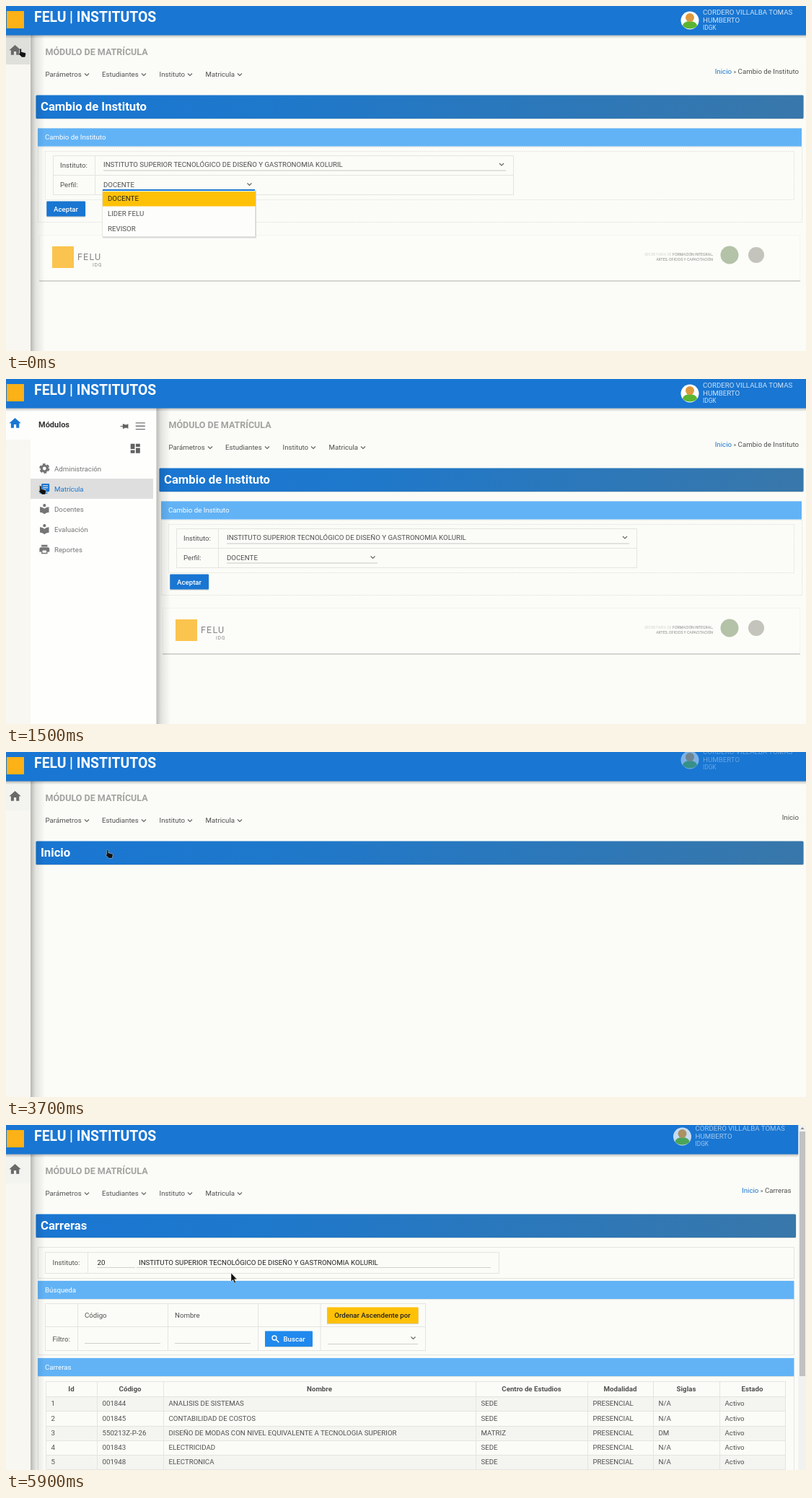
Recreate the animation shown at these times as an HTML page. Size 1109 by 478 pixels, loop 6 s.

```html
<!DOCTYPE html>
<html lang="es">
<head>
<meta charset="utf-8">
<title>Módulo de matrícula</title>
<style>
html, body { margin: 0; width: 100%; height: 100%; overflow: hidden; background: #fbfcf7; }
svg { display: block; font: 9.7px Roboto, sans-serif; fill: #505050; }
.b { font-weight: 700; }
.m { font-weight: 500; }
</style>
</head>
<body>
<svg id="stage" width="1109" height="478" viewBox="0 0 1109 478"></svg>
<script>
const LOOP = 6000, STEP = 100, SHIFT = 171;
const BLUE = '#1976d2', SKY = '#62b3f6', AMBER = '#ffc107', GRAY = '#757575';
const SCHOOL = 'INSTITUTO SUPERIOR TECNOLÓGICO DE DISEÑO Y GASTRONOMIA KOLURIL';
const MODULES = ['Administración', 'Matrícula', 'Docentes', 'Evaluación', 'Reportes'];
const SUBMENU = ['Periodos', 'Centros', 'Carreras', 'Campus', 'Aulas', 'Turnos para Horarios',
  'Personal Administrativo'];
const CAREERS = [
  ['1', '001844', 'ANALISIS DE SISTEMAS', 'SEDE', 'PRESENCIAL', 'N/A', 'Activo'],
  ['2', '001845', 'CONTABILIDAD DE COSTOS', 'SEDE', 'PRESENCIAL', 'N/A', 'Activo'],
  ['3', '550213Z-P-26', 'DISEÑO DE MODAS CON NIVEL EQUIVALENTE A TECNOLOGIA SUPERIOR', 'MATRIZ', 'PRESENCIAL', 'DM', 'Activo'],
  ['4', '001843', 'ELECTRICIDAD', 'SEDE', 'PRESENCIAL', 'N/A', 'Activo'],
  ['5', '001948', 'ELECTRONICA', 'SEDE', 'PRESENCIAL', 'N/A', 'Activo']];
const POINTER = [[0, 18, 59], [500, 14, 59], [700, 22, 68.5], [800, 90, 82], [1000, 274, 100],
  [1200, 110, 144], [1400, 42, 148], [1500, 46, 148], [1900, 93, 155], [2300, 94, 150], [2500, 99, 124],
  [2800, 93, 155], [3500, 93, 155], [4100, 230, 96], [4600, 230, 96], [5000, 246, 172],
  [5500, 247, 171.5], [5600, 252, 174], [5900, 312, 205]];

const BOOK = 'M12 11.55C9.64 9.35 6.48 8 3 8v11c3.48 0 6.64 1.35 9 3.55 2.36-2.19 5.52-3.55 9-3.55V8c-3.48 0-6.64 1.35-9 3.55zM12 8a3 3 0 1 0 0-6 3 3 0 0 0 0 6z';
const ICON = {
  home: 'M10 20v-6h4v6h5v-8h3L12 3 2 12h3v8z',
  pages: 'M4 6H2v14q0 2 2 2h14v-2H4zM20 2H8q-2 0-2 2v12q0 2 2 2h12q2 0 2-2V4q0-2-2-2zM19 11H9V9h10zM15 15H9v-2h6zM19 7H9V5h10z',
  print: 'M19 8H5q-3 0-3 3v6h4v4h12v-4h4v-6q0-3-3-3zM16 19H8v-5h8zM18 3H6v4h12z',
  tiles: 'M3 3h8v10H3zM3 15h8v6H3zM13 11h8v10h-8zM13 3h8v6h-8z',
  pin: 'M2 11h6V6h3l2 2h6l2-2h1v12h-1l-2-2h-6l-2 2H8v-5H2z',
  bars: 'M3 5h18v2H3zM3 11h18v2H3zM3 17h18v2H3z'
};

const clamp = v => Math.max(0, Math.min(1, v));
const easeOut = v => 1 - (1 - clamp(v)) ** 2;
const text = (x, y, s, attrs = '') => `<text x="${x}" y="${y}" ${attrs}>${s}</text>`;
const box = (x, y, x2, y2, fill, attrs = '') =>
  `<rect x="${x}" y="${y}" width="${x2 - x}" height="${y2 - y}" fill="${fill}" ${attrs}/>`;
const frame = (x, y, x2, y2, attrs = '') => box(x + .5, y + .5, x2 + .5, y2 + .5, 'none', `stroke="#e4e4e0" ${attrs}`);
const line = (d, color = '#e4e4e0', w = 1) => `<path d="${d}" fill="none" stroke="${color}" stroke-width="${w}"/>`;
const icon = (d, x, y, size, fill) =>
  `<path d="${d}" fill="${fill}" fill-rule="evenodd" transform="translate(${x} ${y}) scale(${size / 24})"/>`;
const chevron = (x, y) => line(`M${x - 3} ${y - 1.5}l3 3 3-3`, '#666', 1.2);
const heading = (x, x2, y, s) => box(x, y + .4, x2, y + 25.5, SKY) + text(x + 10, y + 16, s, 'fill="#fff"');
const gear = (x, y) => `<g fill="none" stroke="${GRAY}"><circle cx="${x}" cy="${y}" r="4" stroke-width="3.2"/>
  <circle cx="${x}" cy="${y}" r="6" stroke-width="2.2" stroke-dasharray="3.6 2.683"/></g>`;

function pointerAt(t) {
  const i = POINTER.findIndex(p => p[0] > t);
  if (i < 0) return POINTER.at(-1).slice(1);
  const [t0, x0, y0] = POINTER[i - 1], [t1, x1, y1] = POINTER[i], k = (t - t0) / (t1 - t0);
  return [x0 + (x1 - x0) * k, y0 + (y1 - y0) * k];
}

function header(right, shown) {
  const dx = right - 1109, dy = -16 * (1 - shown);
  return box(0, 40, right, 45, 'url(#down)') + box(0, 0, right, 40.5, BLUE)
    + box(1, 7, 25, 31, '#fcb116')
    + text(39, 22, 'FELU', 'class="b" font-size="19.4" fill="#fff"')
    + text(88, 22, '| INSTITUTOS', 'class="b" font-size="19.4" fill="#fff"')
    + `<g transform="translate(${dx} ${dy})" opacity="${shown}">
      <circle cx="948" cy="20" r="12.5" fill="#fff"/>
      <path d="M938 27.500q1-6.500 10-6.500t10 6.500q-4 4-10 4t-10-4z" fill="#5cb531"/>
      <circle cx="948" cy="16" r="6" fill="#dd9a3e"/>
      <g fill="#cfe2f6">${text(966, 11.5, 'CORDERO VILLALBA TOMAS') + text(966, 23, 'HUMBERTO')
        + text(966, 33, 'IDGK', 'font-size="8.3"')}</g></g>`;
}

// Menu, breadcrumb and title shared by all pages; dx is the push from the sidebar.
function pageTop(dx, right, title, highlight) {
  const items = [['Parámetros', 54.5, 112], ['Estudiantes', 133, 191], ['Instituto', 212.5, 255], ['Matricula', 276.5, 324]];
  const crumb = title === 'Inicio' ? title : `<tspan fill="${BLUE}">Inicio</tspan> <tspan font-size="8">»</tspan> ${title}`;
  return `<g transform="translate(${dx} 0)">`
    + text(54.5, 67.5, 'MÓDULO DE MATRÍCULA', 'class="b" font-size="12.5" fill="#a2a2a0"')
    + (highlight ? box(206, 84, 268, 107, '#dcdcda') : '')
    + items.map(([s, x, c]) => text(x, 97.5, s) + chevron(c, 95)).join('') + '</g>'
    + text(right - 10, 93.5, crumb, 'text-anchor="end"')
    + box(41.5 + dx, 156, right - 3.5, 157, '#000', 'opacity=".12"')
    + box(41.4 + dx, 123.5, right - 3.4, 156, 'url(#bar)', 'rx="1.5"')
    + text(48 + dx, 145, title, 'class="b" font-size="16.7" fill="#fff"');
}

function changePage(dx, list) {
  const x = 44 + dx;
  let s = pageTop(dx, 1109, 'Cambio de Instituto')
    + frame(x, 195, 1103, 299, 'stroke-dasharray="2 1"') + heading(x, 1103, 169, 'Cambio de Instituto')
    + frame(x + 10, 201, 1092, 268, 'stroke-dasharray="2 1"')
    + box(46 + dx, 318, 1101, 381, '#fcfdf9') + frame(46 + dx, 317, 1100, 380, 'opacity=".35"')
    + line(`M${46 + dx} 381H1101`, '#c9c9c7', 1.3)
    + text(980, 346, '<tspan opacity=".35">SECRETARÍA DE</tspan> FORMACIÓN INTEGRAL,', 'text-anchor="end" font-size="5.2" fill="#8a8a88"')
    + text(980, 352.5, 'ARTES, OFICIOS Y CAPACITACIÓN', 'text-anchor="end" font-size="5.2" fill="#8a8a88"')
    + '<circle cx="1003" cy="345" r="12.500" fill="#b4c2a8"/><circle cx="1040" cy="345" r="11" fill="#c4c4bd"/>';
  s += `<g transform="translate(${dx} 0)">` + frame(65, 207, 703, 261)
    + line('M65 234.500H704M123.500 207V262') + line('M135 228H693M135 255H344', '#c8c8c6')
    + text(75, 224, 'Instituto:') + text(135, 223.3, SCHOOL) + chevron(687, 219.5)
    + text(75, 251.3, 'Perfil:') + text(135, 251, 'DOCENTE') + chevron(337.5, 247)
    + box(56, 271, 110.5, 292.7, '#000', 'opacity=".15" rx="1"') + box(56.3, 270.4, 110, 291.6, BLUE, 'rx="1"')
    + text(83, 284.5, 'Aceptar', 'class="m" text-anchor="middle" fill="#fff"')
    + box(64, 333, 94, 363, '#fbc44f')
    + text(99, 351.8, 'FELU', 'font-size="12.500" letter-spacing="1.200" fill="#858583"')
    + text(120, 361, 'IDG', 'font-size="6.500" letter-spacing="1" fill="#858583"');
  if (list > 0) s += `<g opacity="${list}">` + box(134, 255, 347, 321.5, '#000', 'opacity=".15"')
    + box(134, 255, 346, 320, '#fdfdfb') + frame(133, 255, 345, 319) + box(134, 257, 346, 277.5, AMBER)
    + line('M134 255H345', BLUE, 2) + text(141, 270.3, 'DOCENTE', 'fill="#222"')
    + text(141, 291.3, 'LIDER FELU') + text(141, 312.2, 'REVISOR') + '</g>';
  return s + '</g>';
}

function homePage(menu, highlight, hover) {
  let s = pageTop(0, 1109, 'Inicio', highlight);
  if (menu > 0) {
    s += `<g opacity="${menu}">` + box(205, 108, 330, 332.5, '#000', 'opacity=".16"')
      + box(206, 108, 329, 331, '#fcfcfa') + frame(205, 107, 328, 330, 'stroke="#d0d0ce"');
    if (hover >= 0) s += box(207, 112 + hover * 22.4, 328, 134.4 + hover * 22.4, '#e2e2e0');
    s += SUBMENU.map((m, i) => text(213.3, 126.3 + i * 22.4, m)).join('')
      + text(213.3, 283, 'Unidades') + text(213.3, 294, 'Administrativas') + text(213.3, 315, 'Maestro de Asignaturas') + '</g>';
  }
  return s;
}

function careersPage() {
  const cols = [55, 126, 218, 651, 806, 897, 989, 1080];
  const heads = ['Id', 'Código', 'Nombre', 'Centro de Estudios', 'Modalidad', 'Siglas', 'Estado'];
  const rowY = i => 376 + i * 20.3;
  return pageTop(0, 1098.5, 'Carreras')
    + frame(44, 169, 1092, 212) + frame(54, 176, 683, 205) + line('M113.500 176V206')
    + line('M126 197.500H179M181 197.500H672', '#d0d0ce')
    + text(64.5, 194, 'Instituto:') + text(126.5, 194, '20', 'fill="#222"') + text(184, 194, SCHOOL, 'fill="#222"')
    + frame(44, 241, 1092, 318) + heading(44, 1092.5, 215.5, 'Búsqueda')
    + frame(54, 247, 581, 312) + line('M54 279.500H582M99.500 247V313M224.500 247V313M349.500 247V313M436 247V313')
    + line('M109 302.500H214M234 302.500H339M446 303.500H571', '#d0d0ce')
    + text(109, 267, 'Código') + text(234, 267, 'Nombre') + text(64.5, 300, 'Filtro:')
    + box(445, 254, 572, 276, '#000', 'opacity=".15"') + box(445, 252.5, 571.5, 275, AMBER, 'rx="1"')
    + text(508, 267, 'Ordenar Ascendente por', 'class="m" text-anchor="middle" fill="#222"')
    + box(359, 287, 425, 308, '#000', 'opacity=".15"') + box(359, 285.5, 425, 307, '#2089ee', 'rx="1"')
    + '<circle cx="372" cy="295" r="3" fill="none" stroke="#fff" stroke-width="1.300"/>' + line('M374.300 297.300l4 4', '#fff', 1.5)
    + text(384.5, 299.5, 'Buscar', 'class="m" fill="#fff"') + chevron(564.5, 295)
    + frame(44, 348, 1092, 490) + heading(44, 1092.5, 322.5, 'Carreras')
    + CAREERS.map((row, i) => (i % 2 ? '' : box(55, rowY(i), 1080, rowY(i + 1), '#f4f4f1'))
      + row.map((s, c) => text(cols[c] + 7.5, rowY(i) + 13.2, s)).join('')
      + line(`M55 ${Math.round(rowY(i)) + .5}H1080`)).join('')
    + line('M55 355.500H1080M55 477.500H1080' + cols.map(x => `M${x + .5} 355V478`).join(''))
    + heads.map((s, c) => text((cols[c] + cols[c + 1]) / 2, 369, s, 'class="b" text-anchor="middle"')).join('');
}

function sidebar(open, hover, pressed) {
  let s = `<g transform="translate(${(open - 1) * 174} 0)">` + box(208, 40, 228, 478, 'url(#side)') + box(0, 40, 208.5, 478, '#fefefd')
    + text(45, 67, 'Módulos', 'class="b" font-size="11" fill="#333"')
    + icon(ICON.pin, 157.5, 59, 13, '#616161') + icon(ICON.bars, 177.5, 56.5, 17.5, GRAY) + icon(ICON.tiles, 170.5, 87.5, 17.5, '#616161');
  if (hover >= 0) s += box(34, 110 + hover * 28, 204, 138 + hover * 28, pressed ? '#e6e6e6' : '#dedede')
    + (pressed ? box(182, 138, 204, 166, '#dfdfdf') : '');
  s += MODULES.map((m, i) => {
    const y = 124 + i * 28, fill = i === 1 ? (pressed ? '#4a98e0' : BLUE) : GRAY;
    const pic = [0, ICON.pages, BOOK, BOOK, ICON.print][i];
    return (pic ? icon(pic, 45, y - 8.3, 16.6, fill) : gear(53.3, y)) + text(67, y + 3.5, m, `fill="${fill}"`);
  }).join('');
  return s + '</g>';
}

function rail(open, hovered) {
  return (open ? '' : box(34, 40, 54, 478, 'url(#side)')) + box(0, 40, 34, 478, '#f8f7f1')
    + (open ? box(0, 40, 34, 84, '#fdfdfc') : box(0, 40, 33.5, 81, hovered ? '#dfdfdc' : '#f3f3ef'))
    + icon(ICON.home, 2.8, 51.5, 19.5, open ? BLUE : '#6a6a6a');
}

function cursor([x, y], arrow) {
  const d = arrow ? 'M0 0v12l2.700-2.500 2 4.500 1.900-.8-2-4.400h3.600z'
    : 'M1 .8q1.300-1.600 2.300 0v3.700l5 1.200q1.300.5 1.200 2l-1 4.300H4L-.5 7.500q0-1.400 1.500-.8z';
  return `<path d="${d}" transform="translate(${x} ${y})" fill="#111" stroke="#fff" stroke-width=".4"/>`;
}

function scene(t) {
  const pos = pointerAt(t), [x, y] = pos;
  const first = t < 3600, careers = t >= 5700;
  const open = first ? easeOut((t - 100) / 400) : 0;
  const row = Math.floor((y - 110) / 28);
  const hover = open === 1 && x > 34 && x < 204 && row >= 0 ? row : -1;
  const right = careers ? 1098.5 : 1109;
  const shown = first ? 1 : easeOut((t - (careers ? 5700 : 3600)) / 400);
  const item = t > 4600 && t < 5500 ? Math.floor((y - 112) / 22.4) : -1;
  const menu = t < 5500 ? clamp((t - 3900) / 200) : t < 5600 ? .93 : 0;
  const page = first ? changePage(open * SHIFT, t < 200 ? 1 - t / 200 : 0)
    : careers ? careersPage() : homePage(menu, t >= 4000 && t < 5500, item);
  return `<defs>
    <linearGradient id="bar"><stop stop-color="${BLUE}"/><stop offset=".3" stop-color="#1e78cb"/><stop offset="1" stop-color="#3877aa"/></linearGradient>
    <linearGradient id="side"><stop stop-opacity=".27"/><stop offset=".35" stop-opacity=".1"/><stop offset="1" stop-opacity="0"/></linearGradient>
    <linearGradient id="down" x2="0" y2="1"><stop stop-opacity=".25"/><stop offset="1" stop-opacity="0"/></linearGradient>
    </defs>` + box(0, 0, 1109, 478, '#fbfcf7') + page
    + (open ? sidebar(open, hover, t >= 3100) : '') + rail(open, t < 200) + header(right, shown)
    + (careers ? box(1098.5, 0, 1109, 478, '#f1f1f0') + box(1100, 9, 1108, 348, '#c1c1c1')
      + '<path d="M1101.500 6l2.500-3 2.500 3z" fill="#888"/>' : '')
    + cursor(pos, t >= 5300);
}

const stage = document.getElementById('stage');
let last = -1;
function tick() {
  const t = Math.floor(performance.now() % LOOP / STEP) * STEP;
  if (t !== last) stage.innerHTML = scene(last = t);
  requestAnimationFrame(tick);
}
tick();
</script>
</body>
</html>
```
